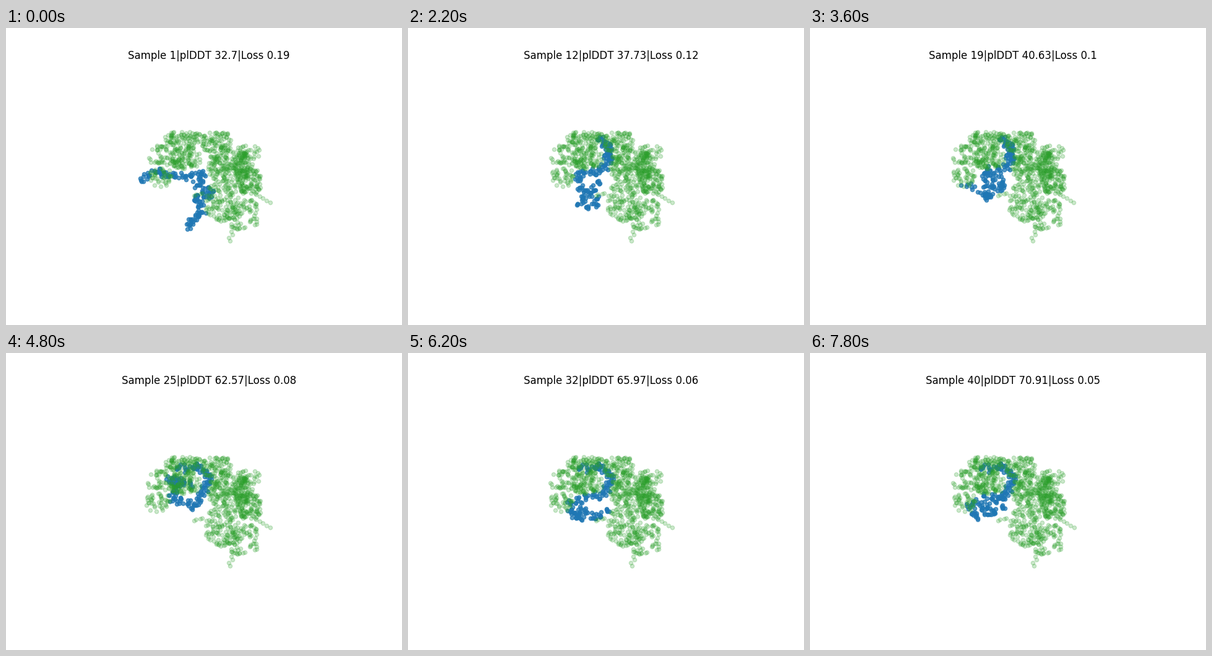
A matplotlib script that plays this animation: 640 px wide and 480 px high, repeating every 8 s.

```python
import numpy as np
import matplotlib.pyplot as plt
from matplotlib.animation import FuncAnimation

FRAMES, INTERVAL = 40, 200
ATOMS = 150
rng = np.random.default_rng(7)


def blob(x, y, w, h, n):
    """Random atoms inside an ellipse with slightly squared corners."""
    r, a = np.sqrt(rng.random(n)), rng.random(n) * 2 * np.pi
    c, s = np.cos(a), np.sin(a)
    return np.column_stack([x + w * r * np.sign(c) * abs(c) ** 0.75,
                            y + h * r * np.sign(s) * abs(s) ** 0.75])


def strand(start, end, n, zigzag):
    """Evenly spaced atoms on a line, alternating from side to side."""
    pts = np.linspace(start, end, n)
    pts[:, 0] += zigzag * (-1.0) ** np.arange(n)
    return pts


def build_body():
    pts = np.vstack([
        blob(287, 177, 30, 12, 84),
        blob(249, 220, 20, 34, 84),
        blob(290, 207, 25, 18, 118),
        blob(340, 183, 24, 18, 92),
        blob(362, 221, 36, 25, 235),
        blob(390, 199, 20, 11, 34),
        blob(393, 244, 20, 22, 112),
        blob(349, 274, 28, 36, 128),
        blob(382, 298, 26, 25, 78),
    ])
    hole = np.hypot(pts[:, 0] - 345, pts[:, 1] - 240) < 5
    return np.vstack([
        pts[~hole],
        strand((404, 266), (427, 279), 5, 0),
        strand((368, 320), (360, 340.6), 5, 2),
        strand((303, 268), (318, 264), 4, 1),
    ])


body = build_body()

# The chain coils loosely around a bent line
turn = np.arange(ATOMS) * 0.9
coil = 3.5 * np.column_stack([np.cos(turn), np.sin(turn)])
coil += rng.normal(0, 2.2, (ATOMS, 2))


def pose(*points):
    t = np.linspace(0, len(points) - 1, ATOMS)
    i = np.arange(len(points))
    return np.column_stack([np.interp(t, i, axis) for axis in zip(*points)]) + coil


ARM = [(306, 174), (318, 184), (327, 195), (322, 204), (326, 212), (313, 227)]
HOOK = [(273, 181), (298, 185), (312, 181), (328, 196), (324, 212), (314, 228)]

stretched = pose((216, 242), (240, 229), (262, 235), (290, 238), (318, 233), (310, 254),
                 (335, 265), (303, 271), (317, 290), (304, 304), (295, 320))
upright = pose((282, 173), (322, 183), (330, 200), (310, 234), (290, 226), (302, 252),
               (266, 240), (284, 262), (290, 290), (326, 289), (308, 305))
ring = pose(*ARM, (296, 232), (273, 232), (277, 252), (290, 264),
            (274, 282), (304, 284), (298, 264), (308, 245))
clump = pose(*ARM, (285, 228), (282, 240), (312, 242), (308, 258),
             (284, 252), (284, 272), (290, 266), (246, 250))
curl = pose(*HOOK, (306, 246), (286, 238), (266, 230), (276, 212),
            (263, 200), (280, 204), (300, 213))
fold = pose(*HOOK, (288, 230), (262, 240), (266, 256), (276, 266),
            (280, 248), (304, 266), (324, 251))
settled = pose(*HOOK, (306, 234), (286, 230), (256, 242), (266, 265),
               (284, 240), (290, 260), (314, 246))

# Values at the key samples, linear in between
KEYS = [1, 8, 12, 19, 25, 32, 40]
POSES = [stretched, upright, ring, clump, curl, fold, settled]
SCORE = [32.7, 36.79, 37.73, 40.63, 62.57, 65.97, 70.91]
LOSS = [0.19, 0.13, 0.12, 0.1, 0.08, 0.064, 0.053]


def chain_at(n):
    k = min(np.searchsorted(KEYS, n, side="right") - 1, len(KEYS) - 2)
    u = (n - KEYS[k]) / (KEYS[k + 1] - KEYS[k])
    return POSES[k] * (1 - u) + POSES[k + 1] * u


def bump(n, centre, width):
    return np.exp(-((n - centre) / width) ** 2)


def body_at(n):
    """The left side shears and the lower tail sways for a while."""
    x, y = body.T
    left = np.clip((300 - x) / 50, 0, 1) * (180 - y) / 10
    low = np.clip((y - 250) / 90, 0, 1)
    dx = bump(n, 26, 6) * left - 2 * bump(n, 17, 5) * low
    return np.column_stack([x + dx, y])


def value_at(n, values):
    return round(float(np.interp(n, KEYS, values)), 2)


fig, ax = plt.subplots(figsize=(6.4, 4.8), dpi=100)
ax.set(xlim=(80, 576), ylim=(422.4, 57.6))  # one unit is one pixel
ax.axis("off")
chain = ax.scatter([], [], s=20, lw=1, color="tab:blue", alpha=0.75, zorder=2)
cloud = ax.scatter([], [], s=20, lw=1, color="tab:green", alpha=0.24, zorder=3)
title = ax.set_title("", pad=5.5)


def update(i):
    n = i + 1
    chain.set_offsets(chain_at(n))
    cloud.set_offsets(body_at(n))
    title.set_text(f"Sample {n}|plDDT {value_at(n, SCORE)}|Loss {value_at(n, LOSS)}")
    return chain, cloud, title


anim = FuncAnimation(fig, update, frames=FRAMES, interval=INTERVAL, repeat=True, repeat_delay=0)
plt.show()
```
